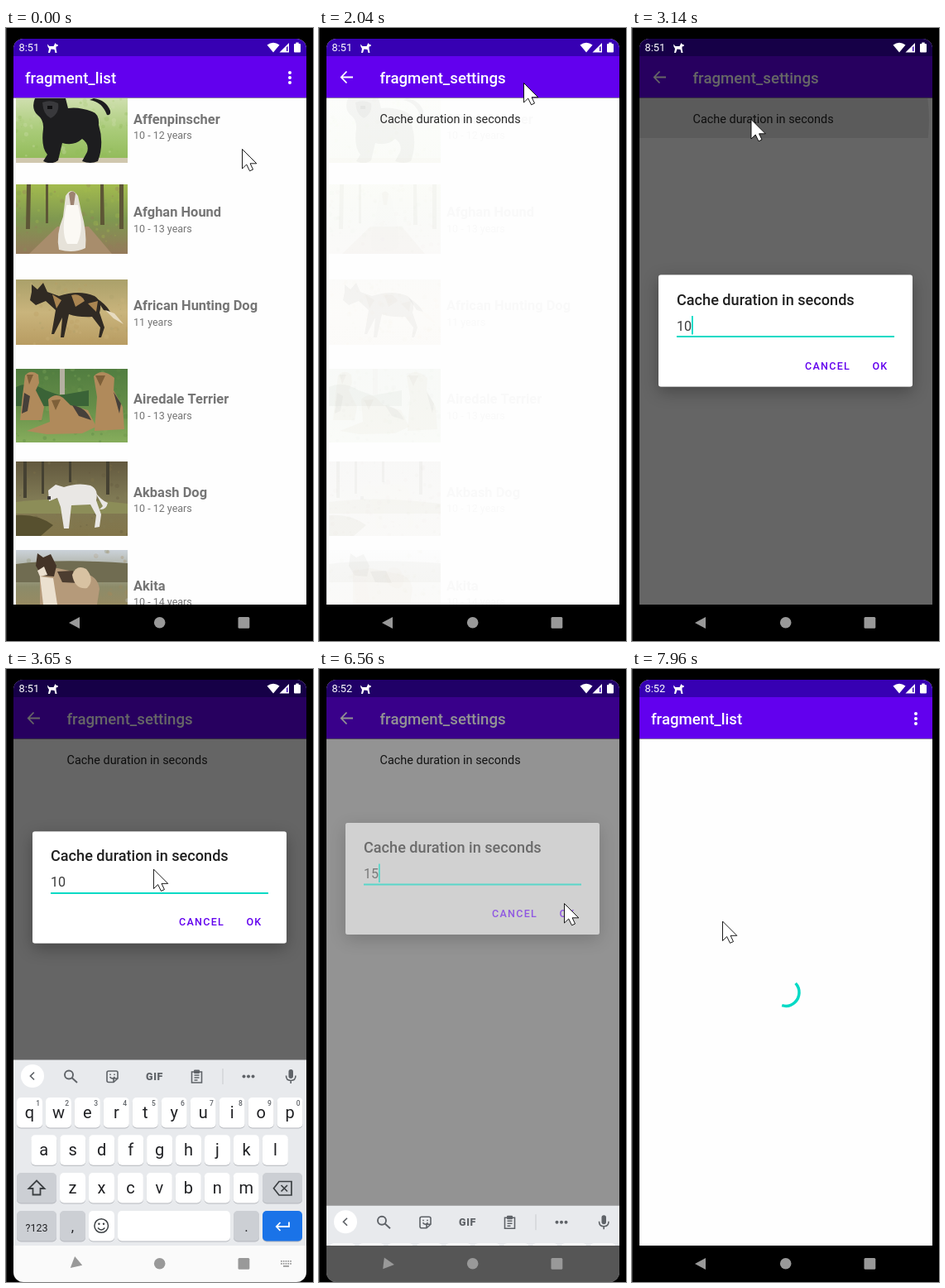
An HTML page with a canvas that plays this animation: 371 by 741 pixels, repeating every 8 s.

```html
<!DOCTYPE html>
<html lang="en">
<head>
<meta charset="utf-8">
<title>Cache duration setting</title>
<style>
html, body { margin: 0; width: 100%; height: 100%; overflow: hidden; background: #000; }
canvas { display: block; }
</style>
</head>
<body>
<canvas id="stage" width="371" height="741"></canvas>
<script>
const c = document.getElementById('stage').getContext('2d');
const LOOP = 8000, TEAL = '#03dac5', PURPLE = '#6200ee', ICON = '#5f6368';

const span = (t, a, b) => Math.min(1, Math.max(0, (t - a) / (b - a)));
const ease = u => u * u * (3 - 2 * u);
const within = (t, a, b) => t >= a && t < b;
const noise = n => { const v = Math.sin(n * 127.1) * 43758.5453; return v - Math.floor(v); };

function rect(x, y, w, h, color, r = 0) {
  c.fillStyle = color;
  c.beginPath();
  c.roundRect(x, y, w, h, r);
  c.fill();
}
function disc(x, y, r, color) {
  c.fillStyle = color;
  c.beginPath();
  c.arc(x, y, r, 0, 7);
  c.fill();
}
function fill(d, color) {
  c.fillStyle = color;
  c.fill(new Path2D(d));
}
function line(d, color, width = 1.6) {
  c.strokeStyle = color;
  c.lineWidth = width;
  c.stroke(new Path2D(d));
}
function text(s, x, y, size, color, weight = 400, align = 'left', spacing = 0) {
  c.font = `${weight} ${size}px Roboto, sans-serif`;
  c.letterSpacing = spacing + 'px';
  c.textAlign = align;
  c.fillStyle = color;
  c.fillText(s, x, y);
}
function clipped(x, y, w, h, r, draw) {
  c.save();
  c.beginPath();
  c.roundRect(x, y, w, h, r);
  c.clip();
  draw();
  c.restore();
}
// White sheet; its shadow stays outside so that it can fade cleanly
function sheet(x, y, w, h, blur, dy, alpha) {
  c.save();
  c.beginPath();
  c.rect(0, -741, 371, 1482);
  c.roundRect(x, y, w, h, 3);
  c.clip('evenodd');
  c.shadowColor = `rgba(0,0,0,${alpha})`;
  c.shadowBlur = blur;
  c.shadowOffsetY = dy;
  rect(x, y, w, h, '#fff', 3);
  c.restore();
  rect(x, y, w, h, '#fff', 3);
}

// Each photo: top, end, background tones, then flat shapes as colour and path
const dogs = [
  { name: 'Affenpinscher', years: '10 - 12', top: 85, end: 163, tones: ['#cfdfae', '#a9cb78', '#8fb956'], shapes: [
    ['#d0c7ae', 'M12 157H147V163H12Z'],
    ['#1d1d1f', 'M35 85Q30 97 38 105Q46 111 45 122Q42 144 50 153L45 161Q55 166 63 160L68 139Q82 143 92 134Q101 140 98 150L92 161Q102 165 111 161Q119 140 112 117Q113 104 104 101Q88 95 75 97L72 85Z'],
    ['#1d1d1f', 'M101 87Q116 89 122 105Q127 106 126 100Q121 87 106 85Z'],
    ['#39393c', 'M44 90Q54 86 63 91Q65 103 54 109Q45 105 44 90Z'],
    ['#101012', 'M50 94H56V98H50Z']] },
  { name: 'Afghan Hound', years: '10 - 13', top: 189, end: 273, tones: ['#a3bb4e', '#7f9850', '#94795a'], shapes: [
    ['#5d5636', 'M25 189H30L29 243H24ZM48 189H51V236H48ZM114 189H118L119 238H114ZM137 189H142V243H137Z'],
    ['#a88d6c', 'M62 240H100L128 273H28Z'],
    ['#e6e2d9', 'M72 203Q79 191 87 203L91 222Q98 246 96 266Q82 273 64 268Q60 250 69 228Z'],
    ['#fbf9f4', 'M73 214Q66 248 74 261H86Q95 243 87 214Z'],
    ['#9c8371', 'M76 200Q80 195 84 200L82 214H78Z']] },
  { name: 'African Hunting Dog', years: '11', top: 304, end: 383, tones: ['#aaa06a', '#c9b47c', '#b89c62'], shapes: [
    ['#302a23', 'M31 319L31 310 38 316 45 308 50 319 64 324Q88 316 107 324Q117 331 113 344L119 362 115 374H112L114 362 104 349Q88 350 76 346L70 374H66L68 350 58 370H55L60 341 48 330 36 335 29 329Z'],
    ['#302a23', 'M108 326Q120 333 126 343L118 341Z'],
    ['#e7dbc0', 'M120 341L131 345 142 358 130 351Z'],
    ['#aa8551', 'M56 322L67 329 61 339ZM79 323Q90 320 95 330L84 337ZM99 333L111 330 109 343Z']] },
  { name: 'Airedale Terrier', years: '10 - 13', top: 412, end: 501, tones: ['#517d40', '#658d48', '#86ad5c'], shapes: [
    ['#b5b0a2', 'M65 412H71V443H65Z'],
    ['#3a6337', 'M12 434Q28 426 48 438L65 444 100 438V457H12Z'],
    ['#b08a5b', 'M23 420Q30 412 39 419L40 429 36 438 46 458 43 474H17L20 444Z'],
    ['#b08a5b', 'M51 449Q60 440 69 447L78 456 99 462 109 482 92 490 49 491 25 487 53 476Z'],
    ['#b08a5b', 'M106 421Q116 410 131 423L130 438 141 458 143 485 107 487 110 446Z'],
    ['#46403a', 'M22 441L29 445 26 463 19 466ZM80 456Q96 458 103 474L88 469ZM130 440L139 454 137 466Z'],
    ['#7e6039', 'M25 419L28 431 33 419ZM55 450L60 462 66 449ZM108 420L114 433 120 420Z']] },
  { name: 'Akbash Dog', years: '10 - 12', top: 524, end: 614, tones: ['#62583e', '#807a55', '#82754a'], shapes: [
    ['#454132', 'M21 524H25V568H21ZM43 524H46V563H43ZM76 524H79V549H76ZM121 524H125V564H121Z'],
    ['#8c8d58', 'M12 573Q70 565 147 575V587H12Z'],
    ['#57502f', 'M12 589Q38 587 57 601L42 614H12Z'],
    ['#e9e7e4', 'M51 559L60 552 70 555Q87 549 102 553Q112 557 109 571L115 588 113 603 107 604 109 589 102 576 79 577 76 605 70 605 66 579 62 568 52 572Z'],
    ['#e9e7e4', 'M107 560Q115 571 123 574Q121 583 113 582L117 578Z'],
    ['#403b39', 'M50 566H54V570H50Z']] },
  { name: 'Akita', years: '10 - 14', top: 631, end: 720, tones: ['#cbd2d9', '#8c8b69', '#a2895a'], shapes: [
    ['#706c51', 'M12 648Q65 641 147 647V670H12Z'],
    ['#b59a7a', 'M41 656L62 653 91 659Q111 661 113 678L110 697H41Z'],
    ['#ebe0cf', 'M41 663L57 665 62 697H45Z'],
    ['#443427', 'M36 650L38 635 45 640 54 636 61 650 58 663 43 662Z'],
    ['#4c3d30', 'M62 657L81 656 88 671 68 670Z'],
    ['#d8c2a2', 'M80 661Q85 648 97 654Q108 667 98 677Q83 679 80 661Z'],
    ['#ebe0cf', 'M38 656L46 651 50 661 41 663Z']] }
];

function photo(dog, index) {
  const { top, end, tones, shapes } = dog;
  clipped(12, top, 135, end - top, 0, () => {
    const g = c.createLinearGradient(0, top, 0, end);
    tones.forEach((tone, i) => g.addColorStop(i / 2, tone));
    rect(12, top, 135, end - top, g);
    const alpha = c.globalAlpha;
    c.globalAlpha = alpha * .3;
    for (let i = 0; i < 90; i++) {
      const k = index * 400 + i * 3;
      disc(12 + 135 * noise(k), top + (end - top) * noise(k + 1), .6 + 2.4 * noise(k + 2), tones[i % 3]);
    }
    c.globalAlpha = alpha;
    shapes.forEach(([color, d]) => fill(d, color));
  });
}

function dogList(alpha) {
  c.globalAlpha = alpha;
  dogs.forEach((dog, i) => {
    const y = 115.5 + i * 112.8;
    photo(dog, i);
    text(dog.name, 154, y, 16.45, '#757575', 700);
    text(dog.years + ' years', 154, y + 18.6, 12.5, '#757575');
  });
  c.globalAlpha = 1;
}

function settingsRow(t, alpha) {
  c.globalAlpha = alpha;
  if (within(t, 2740, 3440)) {
    clipped(9, 85, 354, 48, 0, () =>
      disc(144, 111, 10 + 205 * span(t, 2740, 2960), `rgba(0,0,0,${.12 * (1 - span(t, 3080, 3440))})`));
  }
  text('Cache duration in seconds', 73.5, 115, 14.45, '#212121');
  c.globalAlpha = 1;
}

function appBar(settings) {
  rect(9, 34, 354, 50, PURPLE);
  rect(9, 84, 354, 1, '#8f7fa5');
  if (settings) {
    line('M41 59.5H27M33.5 52.5L26.8 59.5 33.5 66.5', '#fff', 1.8);
    text('fragment_settings', 73.5, 66.7, 18.65, '#fff', 500);
  } else {
    text('fragment_list', 23, 66.7, 18.65, '#fff', 500);
    [54, 60, 66].forEach(y => disc(343, y, 2, '#fff'));
  }
}

function statusBar(t) {
  text(t < 5100 ? '8:51' : '8:52', 15.5, 28.3, 12.8, '#fff');
  fill('M50 19.5L52.5 22H57.5L59.5 18 60.5 19.5 63 20.5 62.5 22 60.5 22.5V25L61.5 30H59.5L58.5 26 54.5 25.5 53 30H51L52 25 50.5 22.5Z', '#fff');
  fill('M315.5 20.5Q323 15 330.5 20.5L323 29.5Z', '#fff');
  fill('M342 18V29.5H330.5Z', '#fff');
  fill('M339 23V28H340.5V22Z', '#3700b3');
  rect(348, 19, 8, 10.5, '#fff', 1);
  rect(350.3, 17.6, 3.4, 2, '#fff');
}

function menu(t) {
  const open = ease(span(t, 780, 960)), alpha = open * (1 - span(t, 1690, 1820));
  if (!alpha) return;
  c.save();
  c.globalAlpha = alpha;
  c.translate(359, 38);
  c.scale(.6 + .4 * open, .6 + .4 * open);
  c.translate(-359, -38);
  sheet(182, 38, 177, 58, 6, 1.5, .25);
  if (t >= 1660) rect(182, 45, 177, 43, `rgba(0,0,0,${.1 * span(t, 1660, 1720)})`);
  text('Settings', 196.5, 73, 14.4, '#333');
  c.restore();
}

function dialog(t) {
  const alpha = span(t, 2925, 3090) * (1 - span(t, 6480, 6672));
  if (!alpha) return;
  const value = within(t, 4720, 5050) ? '1' : t < 4720 ? '10' : '15';
  const caretOff = within(t, 3480, 3980) || within(t, 4520, 4720) || within(t, 5560, 6070);
  c.save();
  c.globalAlpha = alpha;
  c.translate(0, 298.5 - 112.5 * ease(span(t, 3440, 3700)));
  sheet(32, 0, 307, 135, 20, 6, .3);
  text('Cache duration in seconds', 54, 36, 18.1, '#212121', 500);
  text(value, 54, 67, 16.1, '#3a3a3a');
  rect(54, 73.5, 263, 2, TEAL);
  if (!caretOff) rect(value.length > 1 ? 72 : 62.5, 49.5, 1.8, 22.5, TEAL);
  text('CANCEL', 209, 114, 12.5, PURPLE, 500, 'left', 1.3);
  text('OK', 290.5, 114, 12.5, PURPLE, 500, 'left', 1.2);
  c.restore();
}

function key(x, y, w, color, label, size = 20) {
  rect(x, y + 1, w, 36.5, '#b5b8bd', 5);
  rect(x, y, w, 36.5, color, 5);
  if (label) text(label, x + w / 2, y + 25, size, '#202124', 400, 'center');
}

function keyboard(k) {
  if (!k) return;
  c.save();
  c.translate(0, 269 * (1 - k));
  rect(9, 472.5, 354, 269, '#e8eaed');

  disc(32, 492, 14, '#fff');
  line('M34 487.5L29.5 492 34 496.5', ICON, 1.7);
  line('M81 490.5A5 5 0 1 1 71 490.5A5 5 0 1 1 81 490.5M80 494.5L86 500', ICON, 1.9);
  line('M124 486H133Q135 486 135 488V495L130 499.5H124Q122 499.5 122 497.5V488Q122 486 124 486ZM130 499V495H135M125.5 493Q128.5 497 131.5 493M126 489.5V491M131 489.5V491', ICON);
  text('GIF', 179.5, 496.7, 12.5, ICON, 900, 'center', .6);
  line('M224.5 487H236.5V500H224.5ZM227.5 491H233.5M227.5 494H233.5M227.5 497H231.5', ICON);
  rect(227, 484.5, 7, 4.5, ICON, 1);
  rect(261.5, 483, 1, 19, '#c8cacd');
  [287.5, 293, 298.5].forEach(x => disc(x, 492.5, 2, ICON));
  rect(341.5, 484, 5.5, 11, ICON, 2.7);
  line('M338.5 491.5Q338.5 497.5 344.2 497.5Q350 497.5 350 491.5M344.2 497.5V501', ICON);

  const rows = [['qwertyuiop', 13, 518], ['asdfghjkl', 30.3, 563.3], ['zxcvbnm', 65, 609]];
  for (const [letters, x, y] of rows) {
    [...letters].forEach((ch, i) => key(x + i * 34.95, y, 31, '#fff', ch));
  }
  [...'1234567890'].forEach((d, i) => text(d, 38.7 + i * 34.95, 527.5, 8.5, ICON, 500, 'center'));

  const grey = '#cccfd4';
  key(13, 609, 48, grey);
  line('M37 618.5L46.5 628H41.5V635.5H32.5V628H27.5Z', '#3c4043', 1.8);
  key(310, 609, 48, grey);
  line('M330 619.5H345V636H330L323.5 627.7ZM332.5 624L340 631.5M340 624L332.5 631.5', '#3c4043', 1.7);
  key(13, 655, 48, grey, '?123', 12.5);
  key(65, 655, 31, grey, ',', 17);
  key(100, 655, 31, '#fff');
  line('M123.5 673A8.3 8.3 0 1 1 106.9 673A8.3 8.3 0 1 1 123.5 673M111 675.5Q115.2 680.5 119.4 675.5', '#3c4043', 1.5);
  disc(112.4, 670.8, 1.2, '#3c4043');
  disc(118, 670.8, 1.2, '#3c4043');
  key(135, 655, 136, '#fff');
  key(275, 655, 31, grey, '.', 17);
  key(310, 655, 48, '#1a73e8');
  line('M342 668.5V674H327M331.5 669L326.8 674 331.5 679', '#fff', 1.8);
  c.restore();
}

function navBar(t, k) {
  rect(9, 697, 354, 44, '#000');
  rect(9, 697, 354, 44, `rgba(250,250,250,${k})`);
  const turn = t < 6480 ? -90 * ease(span(t, 3520, 3800)) : 270 * (1 - span(t, 6480, 6743));
  c.save();
  c.translate(83.5, 719);
  c.rotate(turn * Math.PI / 180);
  fill('M-7.5 0L5.5 -7V7Z', '#999');
  c.restore();
  disc(185.7, 718.8, 6.8, '#999');
  rect(280.5, 712, 13.8, 13.8, '#999', 1.5);
  if (k === 1) {
    for (let i = 0; i < 10; i++) rect(332 + i % 5 * 2.8, 715 + Math.floor(i / 5) * 3, 1.7, 1.7, '#999');
    rect(335, 721, 7, 1.7, '#999');
  }
}

function spinner(t) {
  if (t < 7600) return;
  const u = (t - 7600) / 360, deg = Math.PI / 180;
  c.strokeStyle = TEAL;
  c.lineWidth = 3.5;
  c.beginPath();
  c.arc(185.7, 391, 16.3, (-90 + 47 * u) * deg, (-90 + 196 * ease(Math.min(1, u))) * deg);
  c.stroke();
}

// Pointer stops: time, x, y
const stops = [
  [45, 285, 146], [380, 338, 62], [980, 338, 62], [1350, 247, 66], [2290, 247, 66], [2500, 143.5, 110],
  [3200, 143.5, 110], [3470, 175, 235], [3500, 175, 235], [3980, 187.5, 263], [5760, 187.5, 263],
  [6030, 268, 294], [6150, 296, 283], [6990, 296, 283], [7050, 305, 287], [7170, 18, 75],
  [7370, 18, 75], [7430, 21, 64], [7620, 21, 64], [7960, 109, 304.5]
];
const clicks = [[610, 740], [1580, 1680], [2680, 2780], [6380, 6480], [7430, 7540]];

function pointer(t) {
  let [, x, y] = stops[0];
  for (let i = 1; i < stops.length; i++) {
    const [a, x0, y0] = stops[i - 1], [b, x1, y1] = stops[i];
    if (t < a) break;
    const u = ease(span(t, a, b));
    x = x0 + (x1 - x0) * u;
    y = y0 + (y1 - y0) * u;
  }
  c.save();
  c.translate(x + .5, y + .5);
  const arrow = 'M0 0V23.5L5.2 18.5 9 26.3 13 24.5 9.6 17.3H17.3Z';
  fill(arrow, '#fff');
  line(arrow, '#000', .9);
  c.restore();
  if (clicks.some(([a, b]) => within(t, a, b))) disc(x, y + .5, 18, 'rgba(255,255,0,.5)');
}

function draw(t) {
  const toSettings = span(t, 1800, 2050), back = span(t, 7580, 7680);
  const k = ease(span(t, 3220, 3470)) * (1 - ease(span(t, 6440, 6640)));
  const dim = .6 * span(t, 2970, 3120) * (1 - span(t, 6500, 6706));

  rect(0, 0, 371, 741, '#000');
  rect(0, 0, 1, 741, '#333');
  clipped(9, 13, 354, 728, 12, () => {
    rect(9, 13, 354, 684, '#fefefe');
    if (toSettings < 1) dogList(1 - toSettings);
    if (toSettings > 0 && back < 1) settingsRow(t, toSettings * (1 - back));
    spinner(t);
    rect(9, 13, 354, 21.5, '#3700b3');
    appBar(within(t, 1780, 7580));
    menu(t);
    if (dim) rect(9, 13, 354, 684, `rgba(0,0,0,${dim})`);
    statusBar(t);
    dialog(t);
    keyboard(k);
    navBar(t, k);
  });
  pointer(t);
}

const start = performance.now();
function tick() {
  draw((performance.now() - start) % LOOP);
  requestAnimationFrame(tick);
}
tick();
</script>
</body>
</html>
```
